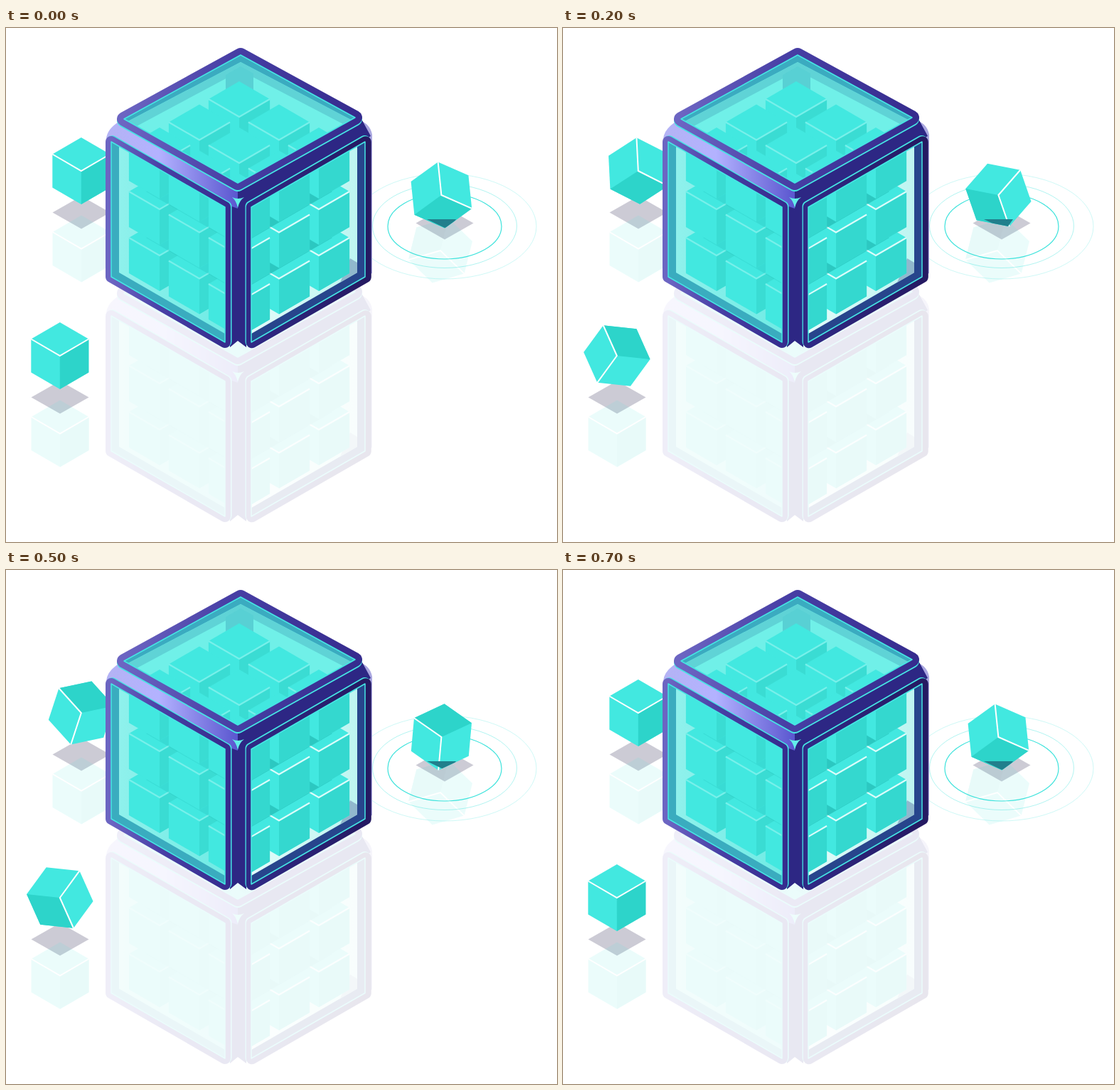
These frames come from a looping animation (775 by 723 pixels, 0.8 s). An HTML page without scripts:

```html
<!DOCTYPE html>
<html lang="en">
<head>
<meta charset="utf-8">
<title>Glass cube</title>
<style>
html, body { margin: 0; width: 100%; height: 100%; overflow: hidden; background: #fff; }
svg { display: block; width: 100%; height: 100%; }
.small { color: #fff; --dark: #2dd4ca; }
.soft { color: #78f0ea; --dark: #3adcd3; --shade: .25; }
.crisp { color: #dcfcfa; --dark: #34d8cf; --shade: .6; }
.lit { fill: #42e8e0; }
.dark { fill: var(--dark); }
.edge { fill: none; stroke: currentColor; stroke-width: 2; }
.shade { fill: #1fb5ae; opacity: var(--shade); }
.frame { stroke-linejoin: round; }
.rim { fill: none; stroke: #45e6e4; stroke-width: 1.5; stroke-linejoin: round; }
.ghost { opacity: .1; }
.ring { fill: none; stroke: #3de3dc; }
</style>
</head>
<body>
<svg viewBox="0 0 775 723">
<defs>
  <linearGradient id="violet"><stop stop-color="#6c65c2"/><stop offset=".45" stop-color="#483fa5"/><stop offset="1" stop-color="#362c8e"/></linearGradient>
  <linearGradient id="navy"><stop stop-color="#302985"/><stop offset="1" stop-color="#251a62"/></linearGradient>
  <linearGradient id="bevel"><stop stop-color="#b4b3f4"/><stop offset=".4" stop-color="#b3b2ff"/><stop offset="1" stop-color="#5a56cf"/></linearGradient>
  <linearGradient id="pane"><stop stop-color="#8ff1ec"/><stop offset="1" stop-color="#70ebe5"/></linearGradient>
  <linearGradient id="clear"><stop stop-color="#e4fcfa"/><stop offset="1" stop-color="#bdf5f1"/></linearGradient>

  <path id="top" d="M166 128 330 38 491 126 326 218z"/>
  <path id="left" d="M148 160 308 252V442L148 350z"/>
  <path id="right" d="M345 252 505 160V350L345 442z"/>
  <path id="topIn" d="M172 131 330 48 485 129 326 218z"/>
  <path id="leftIn" d="M159 166 308 252V430L159 344z"/>
  <path id="rightIn" d="M345 252 494 166V344L345 430z"/>
  <clipPath id="softClip"><use href="#topIn"/><use href="#leftIn"/></clipPath>
  <clipPath id="crispClip"><use href="#rightIn"/></clipPath>
  <clipPath id="tipClip"><path d="M592 269H633L626 279 617 281z"/></clipPath>

  <path id="hex" d="M0-47 40.5-23.5V23.5L0 47-40.5 23.5V-23.5z"/>
  <g id="cube">
    <use href="#hex" class="lit"/>
    <path class="dark" d="M0 0 40.5-23.5V23.5L0 47z"/>
    <path class="edge" d="M-40.5-23.5 0 0 40.5-23.5"/>
  </g>
  <path id="shadow" d="M-40.5 0 0-23 40.5 0 0 23z" fill="#cccbd5"/>

  <use id="block" href="#cube" transform="scale(1.064)"/>
  <g id="row">
    <use href="#block"/><use href="#block" x="56" y="32.5"/><use href="#block" x="112" y="65"/>
  </g>
  <g id="layer">
    <use href="#row"/><use href="#row" x="-56" y="32.5"/><use href="#row" x="-112" y="65"/>
  </g>
  <path id="under" class="shade" d="M0-36 131 40 0 116-131 40z"/>
  <g id="stack" transform="translate(328 125)">
    <use href="#layer" y="130"/><use href="#under" y="130"/>
    <use href="#layer" y="65"/><use href="#under" y="65"/>
    <use href="#layer"/>
  </g>

  <g id="box">
    <path d="M490 128Q512 132 515 150V345L500 350z" fill="#aaa7e0"/>
    <path d="M141 156Q142 142 160 131L326 222V256L310 250z" fill="url(#bevel)"/>
    <path d="M326 222 500 128 513 152 338 256V449L326 440 315 449V250L326 254z" fill="#2d2784"/>

    <g class="frame" stroke-width="20">
      <use href="#top" y="7" fill="#3a3092" stroke="none"/>
      <use href="#top" y="2" fill="#45e6e4" stroke="#45e6e4"/>
      <use href="#top" fill="url(#violet)" stroke="url(#violet)"/>
    </g>
    <use href="#top" fill="#3babc0"/>
    <use href="#topIn" fill="#70f0e8"/>
    <path d="M172 131 330 48 485 129 474 135 330 60 184 138z" fill="#5fd3d6"/>
    <path d="M309 66 330 54 348 64V100H309z" fill="#58d0d4"/>

    <g class="frame" stroke-width="16">
      <use href="#left" x="1.5" y="-.8" fill="#45e6e4" stroke="#45e6e4"/>
      <use href="#left" fill="url(#violet)" stroke="url(#violet)"/>
      <use href="#right" x="-.5" y="-1" fill="#45e6e4" stroke="#45e6e4"/>
      <use href="#right" x=".8" y=".3" fill="url(#navy)" stroke="url(#navy)"/>
    </g>
    <use href="#left" fill="#3aacbf"/>
    <use href="#leftIn" fill="url(#pane)"/>
    <use href="#right" fill="#27458c"/>
    <use href="#rightIn" fill="url(#clear)"/>
    <path d="M484 324 494 330V344L470 358z" fill="#91b8cd"/>

    <g clip-path="url(#softClip)"><use href="#stack" class="soft"/></g>
    <g clip-path="url(#crispClip)"><use href="#stack" class="crisp"/></g>
    <g class="rim"><use href="#top"/><use href="#left"/><use href="#right"/></g>
    <path d="M318 238Q326 242 335 238 328 243 326 253 324 243 318 238z" fill="#62eeea"/>
  </g>
</defs>

<use href="#box" y="245" class="ghost"/>

<g class="ring">
  <ellipse cx="617" cy="279" rx="80" ry="46" stroke-width="1.2"/>
  <ellipse cx="617" cy="278.5" rx="101.500" ry="59" opacity=".4"/>
  <ellipse cx="617" cy="279" rx="129" ry="74" opacity=".25"/>
</g>

<g class="small">
  <use href="#shadow" x="106" y="259.500"/>
  <use href="#shadow" x="76" y="519.500"/>
  <use href="#shadow" x="617" y="274.500"/>
  <use href="#cube" x="106" y="310.500" class="ghost"/>
  <use href="#cube" x="76" y="570.500" class="ghost"/>
  <use href="#cube" transform="translate(611 313) rotate(194)" class="ghost"/>

  <g transform="translate(105.800 201)">
    <use href="#cube"><animateTransform attributeName="transform" type="rotate" calcMode="discrete" dur=".8s" repeatCount="indefinite" values="0;20;57;129;190;258;319;360"/></use>
  </g>
  <g transform="translate(75.800 461)">
    <use href="#cube"><animateTransform attributeName="transform" type="rotate" calcMode="discrete" dur=".8s" repeatCount="indefinite" values="0;-36;-84;-155;-204;-264;-318;-360"/></use>
  </g>
  <g transform="translate(612.400 235)">
    <use href="#cube"><animateTransform attributeName="transform" type="rotate" calcMode="discrete" dur=".8s" repeatCount="indefinite" values="54;72;101;147;208;245;281;414"/></use>
  </g>
  <g clip-path="url(#tipClip)">
    <g transform="translate(612.400 235)" fill="#217f8c">
      <use href="#hex"><animateTransform attributeName="transform" type="rotate" calcMode="discrete" dur=".8s" repeatCount="indefinite" values="54;72;101;147;208;245;281;414"/></use>
    </g>
  </g>
</g>

<use href="#box"/>
</svg>
</body>
</html>
```
